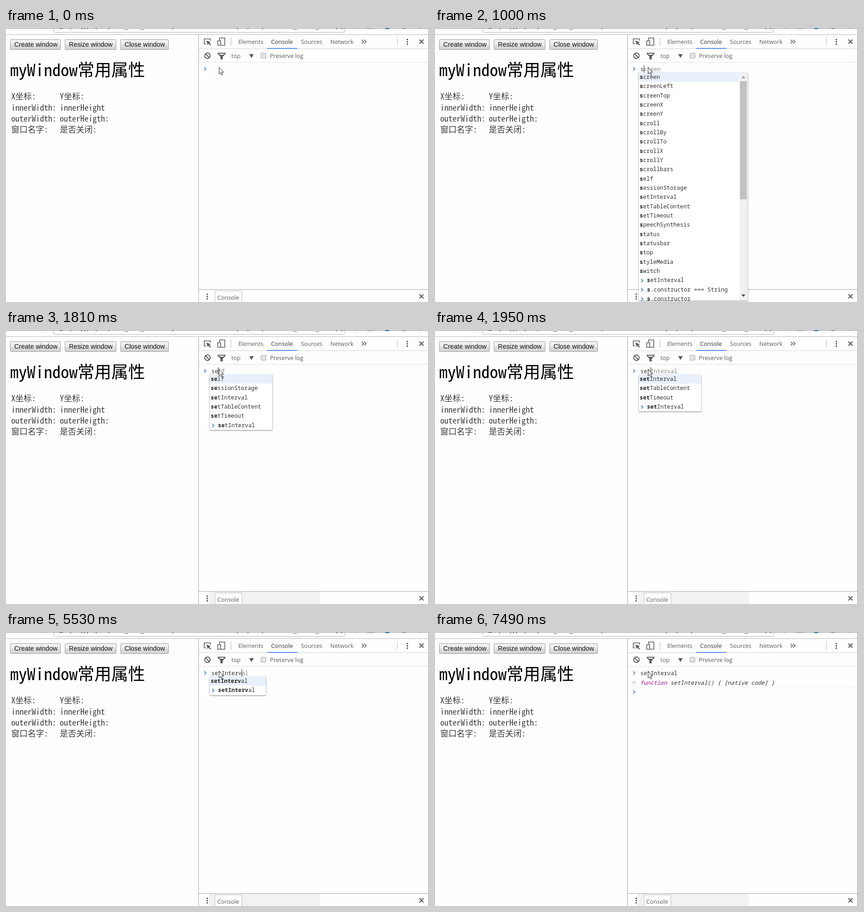
An HTML page that plays this animation: 928 px wide and 603 px high, repeating every 8 s.

```html
<!DOCTYPE html>
<html lang="zh">
<head>
<meta charset="utf-8">
<title>Console autocomplete</title>
<style>
  html, body { margin: 0; width: 100%; height: 100%; overflow: hidden; background: #fefefe; }
  svg { display: block; width: 928px; height: 603px; }
  text { white-space: pre; }
  .btn { font: 14.4px "Liberation Sans", Arial, sans-serif; fill: #111; }
  .page { font: 300 18px "Noto Sans Mono CJK SC", "Noto Sans CJK SC", monospace; fill: #3a3a3a; }
  .head { font: 37px "Noto Sans Mono CJK SC", "Noto Sans CJK SC", monospace; }
  .ui { font: 12.8px "Open Sans", "Noto Sans", sans-serif; fill: #5a5a5a; }
  .mono { font: 12.3px "Noto Sans Mono", "DejaVu Sans Mono", monospace; fill: #303030; }
  .mono .b { font-weight: 700; fill: #222; }
  .hint { fill: #8a8a8a; }
  .out { font-style: italic; }
  .popup { filter: drop-shadow(0 1px 1.5px rgba(0, 0, 0, .5)); }
  .line { fill: none; stroke: #5a5a5a; }
</style>
</head>
<body>
<svg viewBox="0 0 928 603" xmlns="http://www.w3.org/2000/svg">
  <defs>
    <linearGradient id="face" x2="0" y2="1">
      <stop stop-color="#f4f4f4"/><stop offset=".5" stop-color="#ebebeb"/>
      <stop offset=".52" stop-color="#dedede"/><stop offset="1" stop-color="#d2d2d2"/>
    </linearGradient>
  </defs>
  <rect width="928" height="603" fill="#fefefe"/>

  <!-- clipped browser toolbar -->
  <path d="M0 .5H928" stroke="#888"/>
  <path d="M104.5 1V6.5Q104.5 9.5 107.5 9.5H740.5Q743.5 9.5 743.5 6.5V1" fill="#fff" stroke="#b0b0b0"/>
  <g id="crumbs"></g>
  <path d="M115 0Q121 4 127 0" fill="#666"/>
  <path d="M791 0H809V2.5H791Z" fill="#b5b5b5"/>
  <path d="M829 0Q836 6 844 0Z" fill="#4384a8"/>
  <path d="M866 0Q873 5 880 0Z" fill="#999"/>
  <path d="M0 14.5H928" stroke="#b6b6b6"/>

  <!-- page -->
  <g id="buttons"></g>
  <text class="head" x="9" y="106">myWindow常用属性</text>
  <g class="page">
    <text x="11.5" y="157">X坐标:</text>
    <text x="118" y="157">Y坐标:</text>
    <text x="11.5" y="181.5">innerWidth:</text>
    <text x="118" y="181.5">innerHeight</text>
    <text x="11.5" y="206">outerWidth:</text>
    <text x="118" y="206">outerHeigth:</text>
    <text x="11.5" y="230">窗口名字:</text>
    <text x="118" y="230">是否关闭:</text>
  </g>

  <!-- developer tools -->
  <path d="M422.5 15V603" stroke="#a3a3a3"/>
  <path d="M423 575.5H928" stroke="#a3a3a3"/>
  <path d="M927.5 0V603" stroke="#8c8c8c"/>
  <path d="M423 45.5H927" stroke="#d2d2d2"/>
  <path d="M423 75.5H927" stroke="#e0e0e0"/>
  <path d="M493.5 21V39M858.5 21V39" stroke="#b5b5b5"/>
  <path d="M573 44.8H639" stroke="#4585ee" stroke-width="1.8"/>
  <path class="line" stroke-width="1.6" d="M439 35H435V24H448.5V28"/>
  <path fill="#5a5a5a" d="M439.5 27.5L449.5 31.5 446 33 450 37 448 38.5 444.5 34.5 442.5 37.5Z"/>
  <path class="line" stroke-width="1.6" d="M468.5 27V22H480V38H472M464.5 28H471V38H464.5Z"/>
  <g class="ui">
    <text x="509.5" y="35">Elements</text>
    <text x="581.5" y="35" fill="#333">Console</text>
    <text x="647" y="35">Sources</text>
    <text x="711.5" y="35">Network</text>
    <text x="494.5" y="66">top</text>
    <text x="579" y="66">Preserve log</text>
  </g>
  <path class="line" stroke-width="1.7" d="M780.5 26L784.5 30 780.5 34M786 26L790 30 786 34"/>
  <circle class="line" stroke-width="2" cx="442" cy="61" r="6"/>
  <path class="line" stroke-width="2" d="M437.8 56.8L446.2 65.2"/>
  <path fill="#5a5a5a" d="M464.5 54.5H481.5V57L475.5 63V69H470.5V63L464.5 57Z"/>
  <path fill="#fefefe" d="M467 56.5H479L476.5 59H469.5Z"/>
  <path fill="#5a5a5a" d="M533.5 57.5H543.5L538.5 66Z"/>
  <rect x="559.5" y="55.5" width="11" height="11" rx="1.5" fill="#e4e4e4" stroke="#a6a6a6"/>
  <g id="marks"></g>
  <rect id="tint" x="445" y="576" width="244" height="27" fill="#f2f2f2"/>
  <path d="M458.5 603V578.5H517.5V603" fill="#fefefe" stroke="#bdbdbd"/>
  <text class="ui" x="463.5" y="597.5">Console</text>

  <g id="live"></g>
  <path d="M467.5 86.5V101L470.7 98 473.2 103.7 475.4 102.7 473 97.2H477.3Z" fill="#fff" stroke="#222" stroke-linejoin="round"/>
</svg>
<script>
const LOOP = 8000, CHAR = 7.38, ROW = 20.33, TOP = 98, LEFT = 447;
const WORD = 'setInterval';
const names = ('screen screenLeft screenTop screenX screenY scroll scrollBy scrollTo scrollX scrollY ' +
  'scrollbars self sessionStorage setInterval setTableContent setTimeout speechSynthesis ' +
  'status statusbar stop styleMedia switch').split(' ');
const past = ['setInterval', 's.constructor === String', 's.constructor'];

// time, letters typed, letters matched by the list (0: closed), caret shown, submitted
const steps = [
  [0, 0, 0, 0], [590, 0, 0, 1], [1000, 1, 1, 1],
  [1680, 2, 1, 1], [1810, 2, 2, 1], [1950, 3, 3, 1], [4070, 4, 4, 1],
  [4320, 5, 4, 1], [4440, 5, 5, 1],
  [4740, 6, 6, 1], [4860, 7, 7, 1], [4980, 8, 8, 1],
  [5410, 9, 8, 1], [5530, 9, 9, 1],
  [6530, 11, 0, 1], [6930, 11, 0, 1, 1], [7490, 11, 0, 0, 1]
];

const $ = id => document.getElementById(id);
const rect = (x, y, w, h, fill) => `<rect x="${x}" y="${y}" width="${w}" height="${h}" fill="${fill}"/>`;
const text = (x, y, body, cls = 'mono') => `<text class="${cls}" x="${x}" y="${y}">${body}</text>`;
const chevron = (x, y, color) =>
  `<path d="M${x} ${y - 3.7}l3.7 3.7l-3.7 3.7" fill="none" stroke="${color}" stroke-width="1.8"/>`;
const caret = (n, y) => rect(450 + Math.ceil(n * CHAR), y, 1, 17, '#222');

function popup(n) {
  const fits = s => s.startsWith(WORD.slice(0, n));
  const rows = [...names.filter(fits).map(s => [s, 0]), ...past.filter(fits).map(s => [s, 16])];
  const long = rows.length > 20;
  const w = Math.round(Math.max(...rows.map(([s, dx]) => s.length * CHAR + dx))) + (long ? 46 : 26);
  const h = Math.min(502, Math.round(rows.length * ROW));
  let out = rect(LEFT, TOP, w, h, '#fff') + rect(LEFT, TOP, long ? 220 : w, 20, '#e8f0fb');
  rows.forEach(([s, dx], i) => {
    const y = TOP + i * ROW;
    if (dx) out += chevron(452.5, y + 10.5, '#4585ee');
    out += text(449 + dx, (y + 14).toFixed(1), `<tspan class="b">${s.slice(0, n)}</tspan>${s.slice(n)}`);
  });
  if (long) {
    out += rect(668, TOP, 18, h, '#f1f1f1') + rect(669, 117, 15, 260, '#c1c1c1') +
      '<path d="M672 110.5h9l-4.5-5z" fill="#a0a0a0"/><path d="M672 586.5h9l-4.5 5z" fill="#444"/>';
  }
  return `<clipPath id="cut">${rect(LEFT, TOP, w, h, '#000')}</clipPath>` +
    `<g class="popup"><g clip-path="url(#cut)">${out}</g></g>`;
}

function render([, typed, matched, blink, done]) {
  const first = names.find(s => s.startsWith(WORD.slice(0, typed)));
  const hint = matched && matched === typed ? first.slice(typed) : '';
  let out = chevron(434.8, 90, done ? '#8a8a8a' : '#4585ee') +
    text(450.5, 95, `${WORD.slice(0, typed)}<tspan class="hint">${hint}</tspan>`);
  if (done) {
    out += '<path d="M437 108l-3 3l3 3" fill="none" stroke="#aaa" stroke-width="1.4"/>' +
      rect(438.5, 110, 2, 2, '#aaa') + rect(424, 120.5, 503, 1, '#efefef') +
      text(450, 116, '<tspan fill="#aa0d91">function</tspan> setInterval() { [native code] }', 'mono out') +
      chevron(434.8, 132, '#4585ee');
  }
  if (blink) out += done ? caret(0, 125) : caret(typed, 82);
  if (matched) out += popup(matched);
  $('live').innerHTML = out;
}

$('buttons').innerHTML = [[9, 111, 'Create'], [129, 113, 'Resize'], [251, 106, 'Close']].map(([x, w, verb]) =>
  `<rect x="${x + .5}" y="25.5" width="${w - 1}" height="22" rx="1" fill="url(#face)" stroke="#9a9a9a"/>` +
  text(x + 9, 40.5, verb + ' window', 'btn')).join('');

$('crumbs').innerHTML =
  [141, 165, 171, 178, 197, 225, 365, 507, 530, 562, 725, 736].map(x => rect(x, 0, 1.5, 3, '#666')).join('') +
  [260, 295, 630, 679].map(x => rect(x, 3, 8, 1, '#555')).join('') +
  [85, 765, 908].map(x => rect(x, 0, 3, 1.5, '#888')).join('');

const cross = y => `<path class="line" stroke-width="2.2" d="M907 ${y - 4.5}l9 9m0-9l-9 9"/>`;
const dots = (x, y) => [-5, 0, 5].map(d => rect(x - 1.5, y + d - 1.5, 3, 3, '#5a5a5a')).join('');
$('marks').innerHTML = cross(30) + cross(590.5) + dots(880.5, 30.5) + dots(441.5, 591);

let shown = null;
function tick(now) {
  const t = now % LOOP;
  const step = steps.findLast(s => s[0] <= t) || steps[0];
  if (step !== shown) {
    shown = step;
    $('tint').setAttribute('visibility', step[0] >= 1810 ? 'visible' : 'hidden');
    render(step);
  }
  requestAnimationFrame(tick);
}
tick(performance.now());
</script>
</body>
</html>
```
